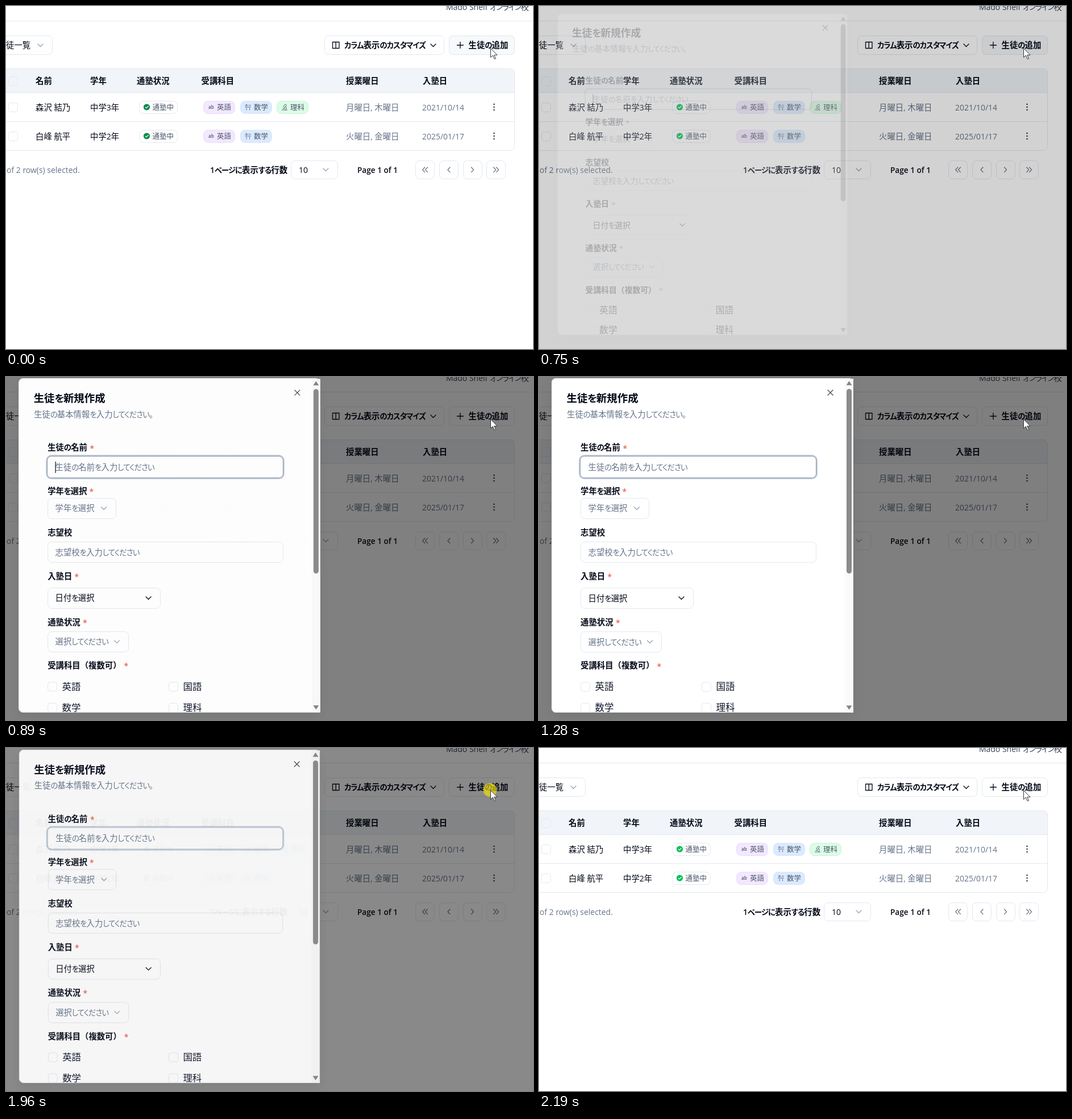
Write an HTML page that moves like this. It is 927 px wide and 604 px high and loops after 2260 ms.

```html
<!DOCTYPE html>
<html lang="ja">
<head>
<meta charset="utf-8">
<title>生徒一覧</title>
<style>
html, body { margin: 0; width: 100%; height: 100%; overflow: hidden; background: #fff; }
svg { display: block; width: 100%; height: 100%; }
text { font-family: "Open Sans", "Noto Sans CJK JP", "Noto Sans CJK", sans-serif; white-space: pre; }
.kana { font-size: .93em; letter-spacing: -.07em; font-feature-settings: "palt"; }
.latin { font-size: .97em; }
</style>
</head>
<body>
<svg id="stage" viewBox="0 0 927 604" xmlns="http://www.w3.org/2000/svg"></svg>
<script>
const INK = '#020817', MUTED = '#64748b', LINE = '#e2e8f0', SOFT = '#f1f5f9';

// Kana and Latin runs are set a little tighter than kanji.
const runs = s => s
  .replace(/[ -~]+|[ぁ-ゖァ-ヺー。]+/g, r =>
    `<tspan class="${r.charCodeAt(0) < 128 ? 'latin' : 'kana'}">${r}</tspan>`);

const text = (x, y, s, { size = 14.4, fill = INK, weight = 400, anchor = 'start' } = {}) =>
  `<text x="${x}" y="${y}" font-size="${size}" fill="${fill}" font-weight="${weight}" text-anchor="${anchor}">${runs(s)}</text>`;
const bold = (x, y, s) => text(x, y, s, { weight: 600 });
const muted = (x, y, s) => text(x, y, s, { fill: MUTED });

const box = (x, y, w, h, { r = 7, fill = '#fff', stroke = LINE, extra = '' } = {}) =>
  `<rect x="${x + .5}" y="${y + .5}" width="${w - 1}" height="${h - 1}" rx="${r}" fill="${fill}" stroke="${stroke}" ${extra}/>`;
const path = (d, stroke = INK, width = 1.3) =>
  `<path d="${d}" fill="none" stroke="${stroke}" stroke-width="${width}" stroke-linecap="round" stroke-linejoin="round"/>`;
const chevron = (x, y, stroke = '#94a3b8') => path(`M${x - 4.5} ${y - 2}l4.5 4.5l4.5 -4.5`, stroke);
const check = (x, y) => box(x, y, 17, 17, { r: 4, fill: 'none' });

const subjects = {
  英語: { x: 347, fill: '#f3e8ff', edge: '#ebdcfc',
    icon: y => `<text x="356" y="${y + 3}" font-size="8" font-weight="600" fill="#475569">ab</text>` },
  数学: { x: 412, fill: '#dbeafe', edge: '#d7e7fd',
    icon: y => path(`M420.500 ${y}h10M423 ${y - 5}v3.500M421 ${y - 3.2}h4M427 ${y - 3.2}h3.500M423 ${y + 2}v3M428.500 ${y + 2}v3`, '#526077', .9) },
  理科: { x: 476, fill: '#dcfce7', edge: '#c8f5d8',
    icon: y => path(`M485.500 ${y + 5}h9M487 ${y + 2.5}h3.500M491.500 ${y - 5}l2 1.500l-3.500 4.500l-2 -1.500zM492.500 ${y - .5}q2 3 -.5 5.500`, '#475569', .9) }
};

function subject(name, y) {
  const { x, fill, edge, icon } = subjects[name];
  return box(x, y - 11, 56, 23, { r: 8, fill, stroke: edge }) + icon(y) +
    text(x + 24, y + 5, name, { size: 12.5, fill: '#475569', weight: 500 });
}

function row(y, name, grade, list, days, date) {
  return check(4, y - 8) + text(52, y + 5.5, name) + text(148, y + 5.5, grade) +
    box(234, y - 11, 68, 23, { r: 8 }) +
    `<circle class="status" cx="247.500" cy="${y}" r="5.600"/>` +
    path(`M245.200 ${y + .2}l1.700 1.700l3.200 -3.400`, '#fff', 1.2) +
    text(257.5, y + 5, '通塾中', { size: 12.5, fill: '#475569', weight: 500 }) +
    list.map(s => subject(s, y)).join('') +
    muted(598, y + 5.5, days) + muted(732, y + 5.5, date) +
    [-5, 0, 5].map(d => `<circle cx="858.500" cy="${y + d}" r="1.350" fill="#334155"/>`).join('');
}

function pager() {
  const arrow = (x, dir) => path(`M${x + 2 * dir} 284l${-4 * dir} 4.300l${4 * dir} 4.300`, '#64697a', 1.2);
  const frames = [720, 762, 804, 845].map(x => box(x, 272, 34, 33)).join('');
  return muted(1, 294, 'of 2 row(s) selected.') + bold(359, 294, '1ページに表示する行数') +
    box(501, 272, 83, 33) + text(515, 294, '10') + chevron(562.5, 288) +
    text(618, 294, 'Page 1 of 1', { size: 14, weight: 600 }) + frames +
    arrow(734.7, 1) + arrow(739.5, 1) + arrow(779, 1) + arrow(820.5, -1) + arrow(859.7, -1) + arrow(864.5, -1);
}

function page() {
  const heads = [[52, '名前'], [148, '学年'], [230, '通塾状況'], [343.5, '受講科目'], [598, '授業曜日'], [733, '入塾日']];
  return text(920, 6.5, 'Mado Shelf オンライン校', { fill: '#334155', weight: 500, anchor: 'end' }) +
    `<path d="M0 26.500H927" stroke="${LINE}"/>` +
    box(-60, 52, 142, 34) + text(-14.4, 74, '生徒一覧') + chevron(60.5, 69) +
    box(560, 52, 211, 34) + path('M574.500 63.500h11.500v11h-11.500zM580.200 63.500v11') +
    bold(595, 74, 'カラム表示のカスタマイズ') + chevron(751.5, 69, INK) +
    box(779, 52, 116, 34) + box(779, 52, 116, 34, { fill: SOFT, extra: 'id="hover"' }) +
    path('M793.500 69h11M799 63.500v11') + bold(813.5, 74, '生徒の追加') +
    `<path d="M-20 152.500V110.500H887q8 0 8 8V152.500z" fill="${SOFT}"/>` +
    box(-20, 110, 915, 145, { r: 8, fill: 'none' }) +
    `<path d="M0 152.500H895M0 203.500H895" stroke="${LINE}"/>` +
    check(4, 124) + heads.map(([x, s]) => bold(x, 137, s)).join('') +
    row(178, '森沢 結乃', '中学3年', ['英語', '数学', '理科'], '月曜日, 木曜日', '2021/10/14') +
    row(229, '白峰 航平', '中学2年', ['英語', '数学'], '火曜日, 金曜日', '2025/01/17') +
    pager();
}

function dialog() {
  const label = (y, s, star) => bold(73, y + 4.8, s) +
    (star ? text(star, y + 6, '*', { fill: '#e5432f' }) : '');
  const option = (x, y, s) => check(x, y - 8) + text(x + 25.5, y + 6.2, s, { size: 16.5, fill: '#0f172a' });
  return `<rect x="22" y="2" width="531" height="589" rx="8" fill="#fff" style="filter:drop-shadow(0 8px 10px rgba(0,0,0,.07))"/>` +
    text(48.5, 43.9, '生徒を新規作成', { size: 18.5, weight: 600 }) +
    muted(49, 70.5, '生徒の基本情報を入力してください。') +
    path('M508 23l9 9M517 23l-9 9', '#3b4150', 1.2) +
    label(124.5, '生徒の名前', 147.5) +
    `<rect id="ring" x="71.500" y="138.500" width="417" height="40" rx="8.500" fill="none" stroke="#c3ccd9" stroke-width="3"/>` +
    box(72, 139, 416, 39, { stroke: '#8797ae', extra: 'id="field"' }) +
    muted(86.5, 164, '生徒の名前を入力してください') +
    `<path id="caret" d="M87 149V169" stroke="${INK}" stroke-width="1.200"/>` +
    label(201, '学年を選択', 146.5) +
    box(73, 213, 121, 37) + muted(86.5, 236.4, '学年を選択') + chevron(172, 231) +
    label(274, '志望校') +
    box(73, 290, 415, 37) + muted(86.5, 313.9, '志望校を入力してください') +
    label(351, '入塾日', 120.5) +
    box(73, 371, 199, 37) + text(86.5, 394.5, '日付を選択') + chevron(250.5, 389, INK) +
    label(432, '通塾状況', 135) +
    box(73, 448, 143, 37) + muted(86.5, 471.5, '選択してください') + chevron(195, 466) +
    label(508.5, '受講科目（複数可）', 207.5) +
    option(73, 545, '英語') + option(286, 545, '国語') + option(73, 582, '数学') + option(286, 582, '理科') +
    `<rect x="538" y="3" width="15" height="588" fill="#fafafa"/>
     <rect x="541" y="21" width="9" height="325" rx="4.500" fill="#8b8b8b"/>
     <path d="M540.500 14.500L545.500 7L550.500 14.500zM540.500 578.500L545.500 586L550.500 578.500z" fill="#858585"/>` +
    box(22, 2, 531, 589, { r: 8, fill: 'none' });
}

const stage = document.getElementById('stage');
stage.innerHTML = page() +
  `<rect id="shade" width="927" height="604"/>
   <g id="dialog">${dialog()}</g>
   <circle id="click" cx="851.500" cy="74" r="12" fill="#ffeb00" opacity=".6"/>
   <path d="M852.500 74.500V90.500L856.300 87L859.200 93.500L861.500 92.500L858.700 86.300H864z" fill="#fff" stroke="#30343c" stroke-width="1" stroke-linejoin="round"/>`;

const part = Object.fromEntries(['hover', 'shade', 'dialog', 'ring', 'field', 'caret', 'click']
  .map(id => [id, document.getElementById(id)]));
const statuses = [...document.querySelectorAll('.status')];
const show = (el, on) => el.setAttribute('visibility', on ? 'inherit' : 'hidden');

// CSS "ease": cubic-bezier(.25, .1, .25, 1), solved by bisection.
function ease(x) {
  if (x <= 0) return 0;
  if (x >= 1) return 1;
  let lo = 0, hi = 1, u = .5;
  for (let i = 0; i < 24; i++) {
    u = (lo + hi) / 2;
    if (.75 * u * (1 - u) + u ** 3 < x) lo = u; else hi = u;
  }
  return .3 * u * (1 - u) ** 2 + 3 * u * u * (1 - u) + u ** 3;
}

const LOOP = 2260, OPEN = 719, SHADE = 705, CLOSE = 1943;
const ticks = [0, 70, 140, 610, 680, 750, 820, 890, 950, 1280, 1760, 1960, 2030, 2110, 2190];
const within = (t, a, b) => t >= a && t < b;

function draw(time) {
  const t = ticks.findLast(k => k <= time);
  const leave = ease((t - CLOSE) / 200);
  const p = ease((t - OPEN) / 200) - leave;
  const dim = ease((t - SHADE) / 200) - leave;
  const hover = t < OPEN ? ease((t + 45) / 150) : 1 - ease((t - OPEN) / 150);
  const scale = .95 + .05 * p;

  part.hover.setAttribute('opacity', hover);
  part.shade.setAttribute('opacity', dim / 2);
  part.dialog.setAttribute('opacity', p);
  part.dialog.setAttribute('transform',
    `translate(287.5 296.5) scale(${scale}) translate(-287.5 -296.5)`);
  show(part.dialog, p > .001);
  part.ring.setAttribute('opacity', t < OPEN + 60 ? 0 : 1);
  part.field.setAttribute('stroke', t < CLOSE ? '#8797ae' : '#b7c2d1');
  show(part.caret, within(t, 750, 1280) || within(t, 1760, 1960));
  show(part.click, within(t, 610, 680) || within(t, 1960, 2030));
  statuses.forEach(c => c.setAttribute('fill', t < 750 ? '#078a4c' : '#00c153'));
}

const start = performance.now();
function loop() {
  draw((performance.now() - start) % LOOP);
  requestAnimationFrame(loop);
}
loop();
</script>
</body>
</html>
```
